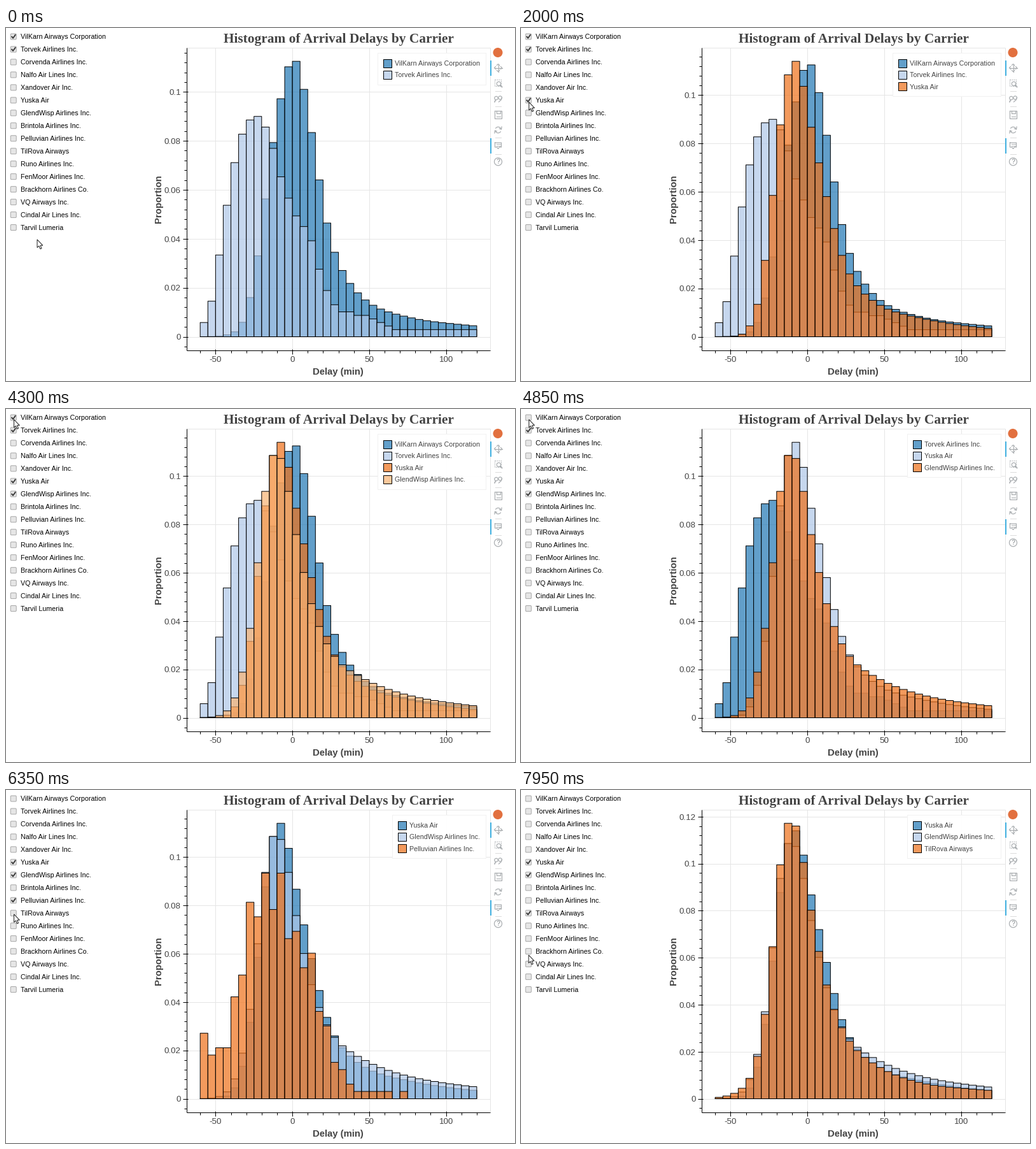
These frames come from a looping animation (800x554 px, 8000 ms). A matplotlib script:

```python
import numpy as np
import matplotlib.pyplot as plt
from matplotlib.animation import FuncAnimation
from matplotlib.collections import LineCollection, PolyCollection
from matplotlib.colors import to_rgba
from matplotlib.patches import Circle, FancyBboxPatch, Polygon, Rectangle

W, H, DPI = 800, 554, 64
STEP, LOOP = 50, 8000
INK, GRID, ICON = "#444444", "#e5e5e5", "#a9adb0"
FILLS = [to_rgba(c, 0.7) for c in ("#1f77b4", "#aec7e8", "#ef7018", "#f9b273")]

LEFT, RIGHT, TOP, BOTTOM = 283.5, 761.3, 30.5, 506.0
X0, X_SCALE, Y0 = 450.1, 2.415, 484.5
LAG = 350     # ms from a click until the plot is redrawn
ARRIVE = 100  # ms the pointer rests on a box before clicking

NAMES = [
    "VilKarn Airways Corporation", "Torvek Airlines Inc.",
    "Corvenda Airlines Inc.", "Nalfo Air Lines Inc.", "Xandover Air Inc.",
    "Yuska Air", "GlendWisp Airlines Inc.", "Brintola Airlines Inc.",
    "Pelluvian Airlines Inc.", "TilRova Airways", "Runo Airlines Inc.",
    "FenMoor Airlines Inc.", "Brackhorn Airlines Co.", "VQ Airways Inc.",
    "Cindal Air Lines Inc.", "Tarvil Lumeria",
]

BINS = np.arange(36)  # five minutes each, from -60 to 120
KNOTS = np.array([0, 2, 4, 6, 8, 10, 12, 14, 17, 21, 27, 35])


def delays(*heights, ripple=0, flights=0):
    """Bar heights: smooth in log space through thousandths at KNOTS,
    with an optional zigzag and rounding to whole flights."""
    logs = np.log(np.array(heights) / 1000)
    slope = np.gradient(logs, KNOTS)
    k = np.clip(np.searchsorted(KNOTS, BINS, "right") - 1, 0, len(KNOTS) - 2)
    span = KNOTS[k + 1] - KNOTS[k]
    u = (BINS - KNOTS[k]) / span
    v = 1 - u
    y = np.exp(logs[k] * (1 + 2 * u) * v * v
               + logs[k + 1] * (1 + 2 * v) * u * u
               + span * u * v * (slope[k] * v - slope[k + 1] * u))
    y *= 1 + ripple * (-1.0) ** BINS
    return np.round(y * flights) / flights if flights else y


DATA = {
    0: delays(.05, .3, 2, 16, 56.3, 97.2, 112.5, 83.4, 34.5, 15, 7.7, 4.5),
    1: delays(5.8, 33.4, 71, 88, 86, 66, 49, 39, 13, 8.5, 2.5, 3,
              flights=689),
    5: delays(.03, .25, 4.5, 31.6, 87.7, 114, 86.7, 58, 26, 13, 7.2, 3.5),
    6: delays(.1, .9, 8.2, 37, 93.7, 107.3, 75.8, 47.2, 25.4, 15.8, 9, 5),
    8: delays(24, 18, 39, 74, 85, 85, 63, 54, 17, 2.7, 1.5, .6,
              ripple=0.1, flights=332),
    9: delays(.6, 2.3, 8.7, 35.9, 99.5, 116, 80.2, 48.4, 24.5, 13.3, 6.3,
              3.6),
}

# (ms, carrier toggled)
CLICKS = [(1500, 5), (2650, 6), (4350, 0), (5300, 1), (5800, 8), (6500, 9),
          (7250, 8)]


def row_y(i):
    return 13.5 + 19.97 * i


# pointer stops: (ms, x, y)
STOPS = ([(0, 49, 332), (850, 28, 150)]
         + [(t, 12.5, row_y(i) + 3) for t, i in CLICKS]
         + [(LOOP + 50, 12, 259)])

fig = plt.figure(figsize=(W / DPI, H / DPI), dpi=DPI, facecolor="white")
ax = fig.add_axes([0, 0, 1, 1])
ax.set_xlim(0, W)
ax.set_ylim(H, 0)
ax.axis("off")


def px(n):
    return n * 72 / DPI


def label(x, y, s, size, color=INK, **kw):
    kw.setdefault("family", "Liberation Sans")
    kw.setdefault("va", "baseline")
    return ax.text(x, y, s, fontsize=px(size), color=color, **kw)


def lines(segs, color, width=1, z=1):
    col = LineCollection(segs, colors=color, linewidths=px(width), zorder=z)
    return ax.add_collection(col, autolim=False)


def stroke(points, color=ICON, width=1.2, z=3, **kw):
    xs, ys = zip(*points)
    return ax.plot(xs, ys, color=color, lw=px(width), zorder=z, **kw)[0]


def ring(x, y, r, width=1.2):
    ax.add_patch(Circle((x, y), r, fill=False, ec=ICON, lw=px(width)))


def x_px(v):
    return X0 + X_SCALE * v


def rect(x0, y0, x1, y1):
    return [(x0, y0), (x1, y0), (x1, y1), (x0, y1)]


def draw_axes():
    majors = [-50, 0, 50, 100]
    lines([[(x_px(v), TOP), (x_px(v), BOTTOM)] for v in majors], GRID)
    lines([[(LEFT, TOP), (RIGHT, TOP)], [(RIGHT, TOP), (RIGHT, BOTTOM)]],
          GRID)
    lines([[(LEFT, TOP), (LEFT, BOTTOM)], [(LEFT, BOTTOM), (RIGHT, BOTTOM)]],
          "black", z=4)
    lines([[(x_px(v), BOTTOM), (x_px(v), BOTTOM + 4)]
           for v in range(-60, 121, 10)], "black", z=4)
    lines([[(x_px(v), BOTTOM - 2), (x_px(v), BOTTOM + 6)] for v in majors],
          "black", z=4)
    for v in majors:
        label(x_px(v), 524.3, str(v), 13.4, ha="center")
    label(522.5, 22.5, "Histogram of Arrival Delays by Carrier", 21.4,
          family="Liberation Serif", weight="bold", ha="center")
    label(522.3, 544.2, "Delay (min)", 14.85, weight="bold", ha="center")
    label(246.6, 268.3, "Proportion", 14.85, weight="bold", rotation=90,
          ha="right", va="center")


def draw_toolbar():
    x = 773.5
    ax.add_patch(Circle((773, 38.5), 7.5, fc="#e2703f", ec="none"))
    for y in (62.5, 184.5):
        stroke([(762, y - 12), (762, y + 12)], "#42b0e0", 2,
               solid_capstyle="butt")
    for y in (98.5, 123, 172, 197.5):
        stroke([(769, y), (778, y)], "#dcdcdc", 1)
    # pan
    y = 62.5
    stroke([(x - 6, y), (x + 6, y)])
    stroke([(x, y - 6), (x, y + 6)])
    for dx, dy in ((1, 0), (-1, 0), (0, 1), (0, -1)):
        ex, ey = x + 6 * dx, y + 6 * dy
        stroke([(ex - 2 * dx + 2 * dy, ey - 2 * dy + 2 * dx), (ex, ey),
                (ex - 2 * dx - 2 * dy, ey - 2 * dy - 2 * dx)])
    # box zoom
    y = 86.5
    stroke(rect(x - 5.5, y - 5.5, x + 4, y + 4) + [(x - 5.5, y - 5.5)],
           width=1, linestyle=(0, (1.6, 1.4)))
    ring(x + 1, y + 1, 3.2)
    stroke([(x + 3.4, y + 3.4), (x + 6, y + 6)], width=1.8)
    # wheel zoom
    y = 111
    ring(x - 3, y - 1, 2.7)
    stroke([(x - 4, y + 2), (x - 5.5, y + 5)], width=1.6)
    ring(x + 3.2, y - 1.5, 2.7)
    stroke([(x + 6, y - 2), (x + 4.5, y + 2), (x + 1, y + 5)])
    # save
    y = 135.8
    stroke(rect(x - 5.7, y - 5.7, x + 5.7, y + 5.7) + [(x - 5.7, y - 5.7)])
    stroke([(x - 3, y - 5.5), (x - 3, y - 1.5), (x + 3, y - 1.5),
            (x + 3, y - 5.5)])
    stroke([(x - 3, y + 3), (x + 3, y + 3)], width=1)
    # reset
    y = 160
    for s in (1, -1):
        a = np.pi * np.linspace(0.2, 0.95, 14)
        stroke(list(zip(x + s * 4.7 * np.cos(a), y + s * 4.7 * np.sin(a))))
        stroke([(x + 2 * s, y - 2 * s), (x + 5.2 * s, y - 1.5 * s),
                (x + 5.6 * s, y - 5 * s)])
    # hover
    y = 184.5
    stroke([(x - 5, y - 4.5), (x + 5, y - 4.5), (x + 5, y + 2.5),
            (x + 2, y + 2.5), (x, y + 5), (x - 2, y + 2.5), (x - 5, y + 2.5),
            (x - 5, y - 4.5)])
    for dy in (-2.2, 0.2):
        stroke([(x - 3, y + dy), (x + 3, y + dy)], width=0.9)
    # help
    ring(x, 209.8, 6)
    label(x, 213.3, "?", 10, ICON, weight="bold", ha="center")


def draw_checkboxes():
    marks = []
    for i, name in enumerate(NAMES):
        y = row_y(i)
        ax.add_patch(FancyBboxPatch(
            (8.6, y - 3.1), 6.2, 6.2, boxstyle="round,pad=1.4",
            fc="#e6e6e6", ec="#a8a8a8", lw=px(1), zorder=5))
        marks.append(stroke([(9.2, y + 0.2), (11, y + 2.4), (14.6, y - 2.6)],
                            "#3a3a3a", 1.9, 6))
        label(23, y + 3.8, name, 10.65, "black")
    return marks


draw_axes()
draw_toolbar()
marks = draw_checkboxes()

y_grid = lines([], GRID)
y_ticks = lines([], "black", z=4)
y_labels = [label(274.8, 0, f"{0.02 * k:g}", 13.4, ha="right")
            for k in range(7)]

legend_box = ax.add_patch(Rectangle((0, 0), 1, 1, fc=(1, 1, 1, 0.95),
                                    ec="#f1f1f1", lw=px(1), zorder=5))
bars, swatches, legend_text = [], [], []
for k, fill in enumerate(FILLS):
    col = PolyCollection([], facecolors=[fill], edgecolors="black",
                         linewidths=px(1), zorder=2 + 0.1 * k, snap=False)
    bars.append(ax.add_collection(col, autolim=False))
    swatches.append(ax.add_patch(Rectangle(
        (0, 0), 13, 13, fc=fill, ec="black", lw=px(1), zorder=6)))
    legend_text.append(label(0, 58.8 + 18.35 * k, "", 10.65, zorder=6))


def text_width(s):
    legend_text[0].set_text(s)
    return legend_text[0].get_window_extent().width


WIDTHS = {i: text_width(NAMES[i]) for i in DATA}

ARROW = np.array([(0, 0), (0, 12.6), (2.9, 10), (4.9, 14.8), (7, 13.9),
                  (5, 9.2), (8.8, 9.2)])
pointer = ax.add_patch(Polygon(ARROW, closed=True, fc="white", ec="#222222",
                               lw=px(1), joinstyle="miter", zorder=10))


def selected(t):
    on = {0, 1}
    for when, i in CLICKS:
        if t >= when:
            on ^= {i}
    return sorted(on)


def pointer_at(t):
    """Rest on each stop, then ease to the next; longer ways take longer."""
    pos = np.array(STOPS[0][1:], float)
    for (t0, *a), (t1, *b) in zip(STOPS, STOPS[1:]):
        way = np.subtract(b, a)
        end = t1 - ARRIVE
        begin = max(t0, end - 300 - 1.2 * np.hypot(*way))
        u = np.clip((t - begin) / (end - begin), 0, 1)
        pos += u * u * (3 - 2 * u) * way
    return pos


def set_scale(peak):
    scale = (BOTTOM - TOP) / (1.1 * peak)
    low, high = -0.05 * peak, 1.05 * peak

    def y_px(v):
        return Y0 - scale * v

    majors = [0.02 * k for k in range(7) if 0.02 * k <= high]
    minors = [0.004 * k for k in range(-1, 32) if low <= 0.004 * k <= high]
    y_grid.set_segments([[(LEFT, y_px(v)), (RIGHT, y_px(v))] for v in majors])
    y_ticks.set_segments(
        [[(LEFT - 4, y_px(v)), (LEFT, y_px(v))] for v in minors]
        + [[(LEFT - 6, y_px(v)), (LEFT + 2, y_px(v))] for v in majors])
    for k, txt in enumerate(y_labels):
        txt.set_visible(k < len(majors))
        txt.set_y(y_px(0.02 * k) + 4.8)
    return y_px


def update(frame):
    t = frame * STEP
    checked = selected(t)
    for i, mark in enumerate(marks):
        mark.set_visible(i in checked)

    shown = selected(t - LAG)
    y_px = set_scale(max(DATA[i].max() for i in shown))
    left = 754 - 36 - max(WIDTHS[i] for i in shown)
    legend_box.set_bounds(left, 38.5, 754 - left,
                          32.1 + 18.35 * (len(shown) - 1))
    for k in range(len(FILLS)):
        used = k < len(shown)
        for art in (bars[k], swatches[k], legend_text[k]):
            art.set_visible(used)
        if not used:
            continue
        i = shown[k]
        bars[k].set_verts([
            rect(x_px(5 * j - 60), y_px(v), x_px(5 * j - 55), Y0)
            for j, v in enumerate(DATA[i])])
        swatches[k].set_xy((left + 8.5, 48.5 + 18.35 * k))
        legend_text[k].set_text(NAMES[i])
        legend_text[k].set_x(left + 27.3)

    pointer.set_xy(ARROW + pointer_at(t))
    return []


anim = FuncAnimation(fig, update, frames=LOOP // STEP, interval=STEP,
                     init_func=lambda: update(0), repeat=True,
                     repeat_delay=0, blit=False)
plt.show()
```
